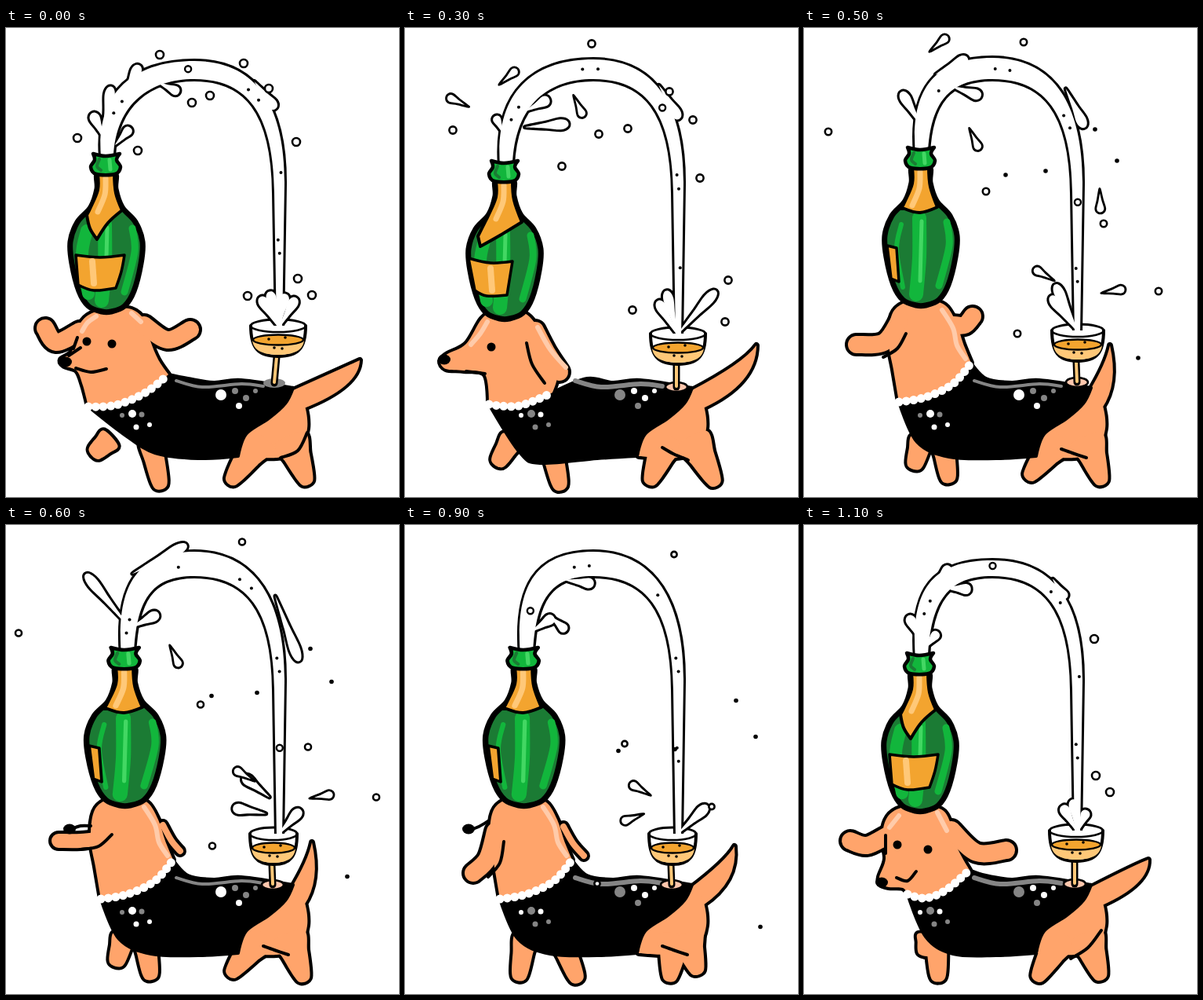
Recreate the animation shown at these times as an HTML page. Size 501 by 597 pixels, loop 1.17 s.

```html
<!DOCTYPE html>
<html lang="en">
<head>
<meta charset="utf-8">
<title>Sparkling dachshund</title>
<style>
  html, body { margin: 0; width: 100%; height: 100%; overflow: hidden; background: #fff; }
  svg { display: block; width: 100vw; height: 100vh; }
  .pose { display: none; stroke-linecap: round; stroke-linejoin: round; }
  .pose.on { display: inline; }
</style>
</head>
<body>
<svg id="stage" viewBox="0 0 501 597"></svg>
<script>
const SKIN = '#ffa46b', GLOW = '#ffcbaa', GOLD = '#f3a42f', PALE = '#ffc878';
const GREEN = '#1b7b34', BRIGHT = '#12b63c', LIME = '#43d763', GREY = '#858585';

const split = s => (s || '').split('|').filter(Boolean);
const rows = s => split(s).map(r => r.trim().split(/[\s,]+/).map(Number));
const slide = (s, [dx, dy]) => s.replace(/([\d.]+),([\d.]+)/g, (_, x, y) => `${+x + dx},${+y + dy}`);

// Smooth curve through points; "!" after a point makes it a corner.
function curve(text, closed = true) {
  const pts = text.trim().split(/\s+/).map(p => {
    const [x, y] = p.split(',').map(parseFloat);
    return { x, y, sharp: p.endsWith('!') };
  });
  const n = pts.length;
  const at = i => closed ? pts[(i + n) % n] : pts[Math.max(0, Math.min(n - 1, i))];
  const handle = (i, sign) => {
    const p = at(i), k = p.sharp ? 0 : sign / 6;
    return `${p.x + (at(i + 1).x - at(i - 1).x) * k} ${p.y + (at(i + 1).y - at(i - 1).y) * k}`;
  };
  let d = `M${pts[0].x} ${pts[0].y}`;
  for (let i = 0; i < (closed ? n : n - 1); i++)
    d += `C${handle(i, 1)} ${handle(i + 1, -1)} ${at(i + 1).x} ${at(i + 1).y}`;
  return d + (closed ? 'Z' : '');
}

const path = (d, fill, width = 0, stroke = '#000', extra = '') =>
  `<path d="${d}" fill="${fill}" stroke="${stroke}" stroke-width="${width}" ${extra}/>`;
const shape = (pts, fill, width) => path(curve(pts), fill, width);
const line = (pts, color = '#000', width = 4) => path(curve(pts, false), 'none', width, color);
const oval = (x, y, rx, ry, fill, width = 0) =>
  `<ellipse cx="${x}" cy="${y}" rx="${rx}" ry="${ry}" fill="${fill}" stroke="#000" stroke-width="${width}"/>`;
const dot = (x, y, r, fill = '#000', width = 0) => oval(x, y, r, r, fill, width);
const each = (list, fn) => list.map(fn).join('');

// Several parts under one common outline; a part with a width is a thick open line.
function merge(parts, fill, edge) {
  const pass = (color, grow) => each(parts, ({ d, width = 0 }) => path(d, width ? 'none' : color, width + grow, color));
  return pass('#000', edge) + pass(fill, 0);
}

// Closed shape along a segment; each station is [place along it, half width].
function along(x, y, u, v, stations) {
  const len = Math.hypot(u - x, v - y), dx = (u - x) / len, dy = (v - y) / len;
  const side = s => ([t, w]) => `${x + dx * t * len - dy * w * s},${y + dy * t * len + dx * w * s}`;
  return curve([...stations.map(side(1)), ...stations.map(side(-1)).reverse()].join(' '));
}

const tear = ([x, y, u, v]) => {
  const w = Math.min(6.5, Math.hypot(u - x, v - y) * .2);
  return along(x, y, u, v, [[0, .5], [.45, w * .55], [.8, w], [.97, w * .5]]);
};
const limb = (x, y, u, v, hip) => along(x, y, u, v, [[0, hip], [.5, hip * .5 + 6], [1, 10], [1.15, 5]]);

const legs = feet => feet.map(([x, y], i) => ({
  d: i < 2 ? limb(x * .6 + 66, 522, x, y, 13) : limb(x * .4 + 209, 522, x, y, 20)
}));

function tail([x, y]) {
  const cx = 366 + .8 * (x - 366) + 8, cy = 455 + .2 * (y - 455);
  return { d: `M364 462Q${cx - 8} ${cy - 18} ${x} ${y}Q${cx + 8} ${cy + 8} 380 484Z` };
}

const views = {
  front: {
    head: '98,455 90,436 74,430 70,422 84,412 90,385 104,366 130,358 160,358 178,374 184,398 194,422',
    neck: '105,482! 140,480 178,464 207,441!', belly: '190,541 150,517',
    glow: '97,386 104,375 115,367|160,363 172,374',
    eyes: '103,399|135,402', nose: '76,425',
    marks: '91,394 86,408|80,417 95,407|89,433 108,438 128,434', thigh: '384,515 372,538 350,547'
  },
  side: {
    head: '102,441 75,436 52,434 45,424 54,415 78,402 98,370 115,362 150,362 172,385 195,430',
    neck: '107,479! 145,481 188,464!', belly: '172,554 146,540',
    glow: '105,374 96,389 84,403|169,381 185,409 205,432',
    eyes: '110,406', nose: '50,422',
    marks: '78,437 102,440|155,401 162,428 178,452', thigh: '328,534 342,542 361,550'
  },
  back: {
    head: '114,435 108,400 112,365 128,350 155,346 180,353 194,375 203,402',
    neck: '121,476! 155,470 190,453 213,426!', belly: '185,546 144,527',
    glow: '176,359 190,382 195,404 206,421', eyes: '', nose: '', marks: '', thigh: '328,536 342,541 360,547'
  },
  smile: {
    head: '126,462 108,461 97,457 96,448 104,425 100,400 104,376 118,362 145,357 175,362 187,380 195,410',
    neck: '132,470! 155,475 182,464 211,439!', belly: '190,546 155,524',
    glow: '109,385 121,370|170,366 182,389',
    eyes: '119,407|158,413', nose: '99,455',
    marks: '104,395 104,418|118,449 132,453 143,441', thigh: '379,516 362,538 340,552'
  }
};

const spots = '161,491,5|148,493,3|183,505,3|173,492,3.5|274,467,7|292,462,4|297,481,4|306,471,4|166,508,3.5|318,462,3';

function dog(p) {
  const shift = p.shift || [0, 0];
  const v = Object.fromEntries(Object.entries(views[p.view]).map(([k, s]) => [k, slide(s, shift)]));
  const seam = v.neck.split(' ').reverse().join(' ');
  const rump = { d: curve('366,460! 380,478 384,510 372,538 345,547 298,545! 306,517 335,495 356,476') };
  const hem = '232,446 265,451 300,448 366,458! 356,478 335,497 306,517 296,545! 245,548 ';
  const ears = split(slide(p.ears, shift)).map((e, i) => ({ d: curve(e, false), width: p.earWidth?.[i] || 22 }));
  return merge([tail(p.tail), rump, ...legs(p.feet)], SKIN, 8) + line(v.thigh) +
    shape(v.neck + ' ' + hem + v.belly, '#000', 4) + line('217,449 250,457 300,453 328,456', GREY, p.flip ? 4 : 6) +
    each(rows(spots), ([x, y, r], i) => dot(x, y, r, (i % 2 > 0) === !p.flip ? '#fff' : GREY)) +
    merge([{ d: curve(v.head + ' ' + seam) }, ...ears], SKIN, 8) +
    path(curve(v.neck, false), 'none', 11, '#fff', 'stroke-dasharray="0 9.5"') +
    each(split(v.glow), s => line(s, GLOW, 6)) +
    each([...split(v.marks), ...split(p.marks)], s => line(s)) +
    each(rows(v.eyes), ([x, y]) => dot(x, y, 5.5)) +
    each(rows(v.nose || p.nose), ([x, y]) => oval(x, y, 8, 6.5, '#000'));
}

const wraps = {
  front: { foil: '107,255 116,269! 130,248 148,232!', label: '89,289! 120,292 151,289! 147,310 140,331! 112,334 92,327!' },
  side: { foil: '94,256! 97,269! 122,255 150,238!', label: '82,284! 110,290 138,288! 131,331! 105,332 90,325!' },
  back: { foil: '107,238! 127,243 149,236!', label: '85,285! 97,288! 100,331! 90,327!' }
};

function bottle(view, move) {
  const wrap = wraps[view] || wraps.front, back = view === 'back';
  const profile = [[184, 11], [205, 12], [228, 20], [247, 37], [272, 46], [300, 44], [335, 35], [354, 23], [361, 6]];
  const half = s => profile.map(([y, r]) => `${128 + s * r},${y}`);
  return `<g transform="${move}">` +
    shape([...half(-1), ...half(1).reverse()].join(' '), GREEN, 7) +
    line('103,258 97,290 105,338', BRIGHT, back ? 6 : 16) + line('126,250 126,300 122,347', BRIGHT, 18) +
    line('129,254 127,330', LIME, 5) + line('161,255 164,285 151,336', BRIGHT, 9) +
    shape(`117,186! 117,206 108,228 103,238! ${wrap.foil} 140,210 138,186!`, GOLD, 4) +
    line('127,191 126,212 117,234', PALE, 7) +
    shape(wrap.label, GOLD, 3.5) + (back ? '' : line('110,297 112,325', PALE, 8)) +
    shape('111,160! 127,163 145,160! 141,168 146,177 139,186 115,186 108,177 113,168', BRIGHT, 4.5) +
    line('119,167 116,176 121,181', GREEN, 4) + line('132,168 133,180', LIME, 5) + '</g>';
}

function cup([x, y, r, bx, by], foot) {
  const bowl = (w, top, low) => `M${x - w} ${top}C${x - w} ${y + 28} ${x - w * .75} ${low} ${x} ${low}` +
    `S${x + w} ${y + 28} ${x + w} ${top}`;
  return oval(bx, by, 14, 6, foot, foot === GREY ? 0 : 2.5) +
    line(`${x - 2},${y + 40} ${bx},${by}`, '#000', 9) + line(`${x - 2},${y + 40} ${bx},${by - 1}`, PALE, 4) +
    path(bowl(r, y, y + 39), '#fff', 4) + path(bowl(r - 2, y + 17, y + 37), PALE) +
    oval(x, y + 18, r - 3, 6.5, GOLD, 2.4) +
    each([[-12, 17], [9, 15], [-5, 28], [5, 29]], ([dx, dy]) => dot(x + dx, y + dy, 1.8)) +
    path(`M${x - r} ${y}A${r} 8 0 0 0 ${x + r} ${y}`, 'none', 2.6);
}

function stream(p, k) {
  const [mx, my] = p.mouth, end = p.glass[1] + 5;
  const jet = `M${mx - 8} ${my}C${mx - 15} 80 165 ${p.top} 240 ${p.top}C320 ${p.top} 356 100 355 200L352 ${end}` +
    `L345 ${end}L342 210C341 105 305 65 240 65C185 65 ${mx + 11} 95 ${mx + 8} ${my}Z`;
  const mid = document.createElementNS('http://www.w3.org/2000/svg', 'path');
  mid.setAttribute('d', `M${mx} ${my}C${mx - 2} 90 175 52 240 52C312 52 348 105 349 200L348.5 ${end}`);
  const bubbles = [0, .03, .2, .35, .38, .55, .7, .73].map((s, i) => {
    const at = mid.getPointAtLength(mid.getTotalLength() * ((s + k * .1 + .1) % .9));
    return i === 2 ? dot(at.x, at.y, 4, '#fff', 2.4) : dot(at.x + (i % 3 - 1) * 2, at.y, 2);
  });
  return merge([{ d: jet }, ...rows(p.fingers).map(f => ({ d: tear(f) }))], '#fff', 6) + bubbles.join('');
}

// Spray: start and speed per pose, pulled down by a common gravity.
const fly = ([x, y, vx, vy], k) => [x + vx * k, y + vy * k + 1.5 * k * k];
const drops = rows('196,34,21,-10|303,45,17,15|91,140,-15,-8|237,95,5,17|308,341,-9,6|390,340,9,14|' +
  '168,156,16,7|335,77,16,17|370,145,3,20|260,86,12,18|372,319,20,-2');
// Loose tears add a direction in degrees and the first and last pose they are seen in.
const tears = rows('104,106,20,-30,-40,1,4|41,117,6,-18,205,2,3|232,84,-2,12,65,1,6|378,100,0,28,88,3,4|' +
  '300,318,-2,-9,210,3,7|275,368,0,-9,160,6,7|378,320,8,-3,-10,4,5');

function spray(k) {
  const fresh = k > 7, age = fresh ? 0 : k;
  const balls = drops.filter(d => !fresh || d[0] > 365).map((d, i) => {
    const [x, y] = fly(d, age);
    return i % 2 && age > 2 ? dot(x, y, 2.8) : dot(x, y, 5 - age * .2, '#fff', 2.6);
  });
  const loose = tears.filter(t => k >= t[5] && k <= t[6]).map(t => {
    const [x, y] = fly(t, k), a = t[4] * Math.PI / 180;
    return path(tear([x - 30 * Math.cos(a), y - 30 * Math.sin(a), x, y]), '#fff', 2.8);
  });
  return balls.join('') + loose.join('');
}

const render = (p, k) => dog(p) + oval(p.glass[0], p.glass[1], p.glass[2], 8, '#fff', 3) + stream(p, k) +
  cup(p.glass, p.foot || '#ffc7ad') + bottle(p.wrap || p.view, p.bottle) + spray(k);

const front = {
  view: 'front', flip: true, foot: GREY, tail: [451, 423], feet: [[113, 541], [196, 578], [290, 572], [382, 573]],
  ears: '94,386 64,400 50,382|176,378 206,397 235,384', bottle: '',
  glass: [347, 379, 35, 342, 452], mouth: [129, 164], top: 42,
  fingers: '126,142 110,108|125,130 134,74|140,148 159,127|150,88 170,47|195,70 221,82|318,70 344,103|' +
    '347,380 324,342|347,380 336,335|348,380 356,338|349,380 370,343'
};
const droop = {
  ...front, flip: false, foot: '', tail: [448, 404], feet: [[119, 552], [197, 579], [314, 573], [393, 574]],
  ears: '100,380 74,406 48,427|178,376 200,412 230,434', bottle: 'translate(-1 4)',
  glass: [348, 388, 36, 344, 459], mouth: [129, 170],
  fingers: '127,135 98,85|155,78 178,41|140,150 174,119|325,70 357,113|347,388 311,343|349,388 374,345'
};
const profile = {
  ...droop, view: 'side', tail: [401, 391], feet: [[144, 575], [204, 573], [309, 566], [381, 573]],
  ears: '166,385 180,412 197,438', bottle: 'translate(-1 9)',
  glass: [348, 389, 35, 346, 457], mouth: [129, 175], top: 40,
  fingers: '126,135 115,112|155,105 184,90|156,126 209,122|325,75 350,116|347,390 322,347|347,390 333,334|349,388 397,334'
};
const away = {
  ...profile, view: 'back', flip: true, tail: [390, 404], feet: [[141, 556], [184, 571], [290, 567], [378, 573]],
  ears: '122,372 102,400 67,403|190,378 205,378 215,367', marks: '130,389 119,408 101,419',
  bottle: 'translate(21 -8)', glass: [349, 385, 33, 348, 451], mouth: [150, 160], top: 38,
  fingers: '150,125 124,81|170,58 209,38|190,75 226,87|335,80 358,127|348,385 314,341|348,385 320,326'
};
const peek = {
  ...away, tail: [394, 401], feet: [[124, 550], [197, 574], [290, 572], [381, 573]],
  ears: '125,399 95,402 67,402|200,382 211,402 222,415', earWidth: [18, 8],
  marks: '135,394 118,409 95,413|81,388 95,383 108,383', nose: '81,387',
  bottle: 'translate(16 -4) scale(1.06 1)', glass: [341, 393, 30, 340, 458], mouth: [155, 166], top: 34,
  fingers: '153,125 101,62|165,60 231,25|160,130 195,113|345,95 374,174|348,393 376,362|334,345 302,320|329,367 289,360'
};
const glance = {
  ...peek, flip: false, tail: [420, 409], feet: [[146, 572], [218, 574], [338, 573], [372, 565]],
  ears: '115,390 105,425 87,443|202,384 214,405 228,421', earWidth: [22, 8],
  marks: '126,403 121,430 106,448|83,388 94,384 106,377',
  fingers: '162,135 190,117|185,116 206,135|205,70 241,75|349,392 386,357'
};
const smile = {
  ...droop, view: 'smile', tail: [439, 426], feet: [[155, 545], [171, 573], [300, 572], [377, 571]],
  ears: '105,396 80,408 59,402|188,388 220,417 258,414', bottle: 'translate(20 3)',
  glass: [347, 389, 34, 345, 457], mouth: [150, 170], top: 45,
  fingers: '150,150 133,115|165,75 187,53|153,158 171,136|180,80 213,82|318,70 334,94|' +
    '348,390 329,357|348,390 343,349|349,390 361,363'
};

// In-between poses take the turned head with the legs of a neighbour.
const turnIn = { ...profile, tail: droop.tail, feet: droop.feet };
const turnAway = { ...peek, tail: away.tail, feet: away.feet };
const turnBack = { ...smile, view: 'side', ears: profile.ears, shift: [21, -5], tail: glance.tail };

const LOOP = 1170;
const timeline = [[0, front], [200, droop], [300, turnIn], [400, profile], [500, away],
  [600, turnAway], [700, peek], [900, glance], [1000, turnBack], [1100, smile]];

const stage = document.getElementById('stage');
stage.innerHTML = timeline.map(([, p], k) => `<g class="pose">${render(p, k)}</g>`).join('');
const start = performance.now();

function tick() {
  const t = (performance.now() - start) % LOOP;
  const now = timeline.filter(([at]) => at <= t).length - 1;
  [...stage.children].forEach((g, i) => g.classList.toggle('on', i === now));
  requestAnimationFrame(tick);
}
tick();
</script>
</body>
</html>
```
